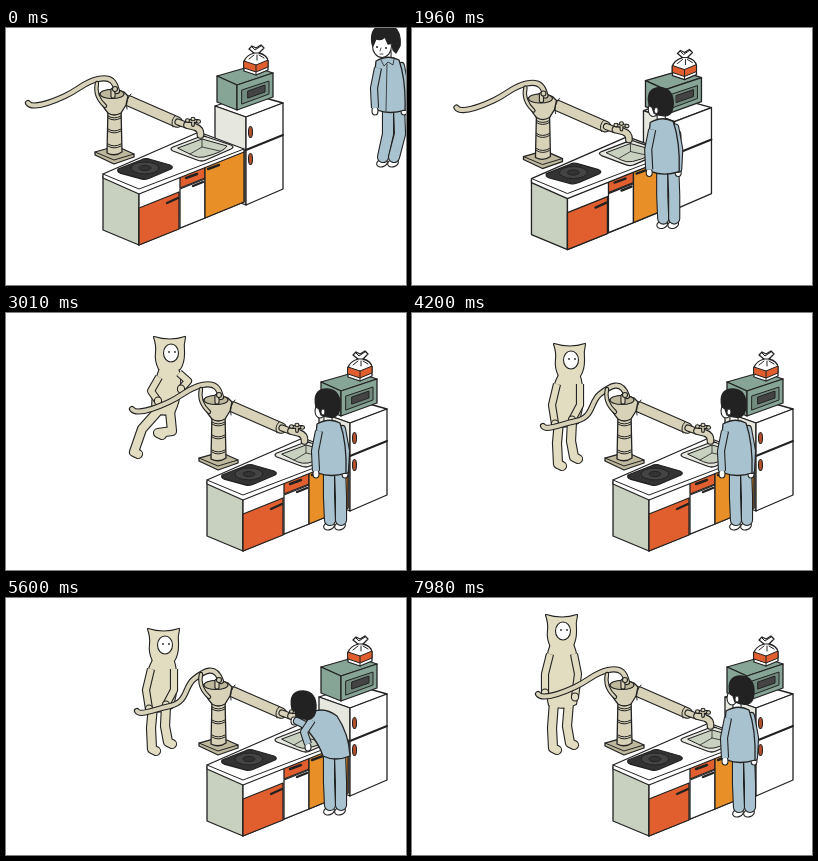
These frames come from a looping animation (400 by 257 pixels, 8000 ms). An HTML page with a canvas:

```html
<!DOCTYPE html>
<html lang="en">
<head>
<meta charset="utf-8">
<title>Kitchen pump</title>
<style>
  html, body { margin: 0; height: 100%; overflow: hidden; background: #fff; }
  canvas { display: block; width: 100vw; height: 100vh; }
</style>
</head>
<body>
<canvas id="stage"></canvas>
<script>
const LOOP = 8000, STEP = 70, W = 400, H = 257;
const INK = '#222', WHITE = '#fff', SAGE = '#c8d0bf', PALE = '#e6e8e0', TEAL = '#86a597', RED = '#e15f2e',
      AMBER = '#e98f28', CLAY = '#d7d2b8', CLAY_DARK = '#beb89d', CAT = '#e2dcc0', BLUE = '#a8c3cf';

const canvas = document.getElementById('stage');
const ratio = window.devicePixelRatio || 1;
canvas.width = W * ratio;
canvas.height = H * ratio;
const ctx = canvas.getContext('2d');

// Eased progress of t from a to b
const ease = (t, a, b) => {
  const k = Math.min(1, Math.max(0, (t - a) / (b - a)));
  return k * k * (3 - 2 * k);
};
const lerp = (a, b, k) => a + (b - a) * k;

// Blend two paths that share the same commands
const NUMBER = /-?\d+(\.\d+)?/g;
const mix = (a, b, k) => {
  const ends = b.match(NUMBER);
  let i = 0;
  return a.replace(NUMBER, n => lerp(+n, +ends[i++], k).toFixed(2));
};
const mixPose = (a, b, k) =>
  Object.fromEntries(Object.keys(a).map(part => [part, mix(a[part], b[part], k)]));
const point = text => text.match(NUMBER).slice(-2).map(Number);

function shape(d, fill, width = 1.3) {
  const path = new Path2D(d);
  if (fill) { ctx.fillStyle = fill; ctx.fill(path); }
  if (width) { ctx.strokeStyle = INK; ctx.lineWidth = width; ctx.stroke(path); }
}
function oval(x, y, rx, ry, fill, width = 1.1, tilt = 0) {
  ctx.beginPath();
  ctx.ellipse(x, y, rx, ry, tilt, 0, Math.PI * 2);
  ctx.fillStyle = fill;
  ctx.fill();
  if (width) { ctx.strokeStyle = INK; ctx.lineWidth = width; ctx.stroke(); }
}
function thick(path, width, color) {
  ctx.strokeStyle = color;
  ctx.lineWidth = width;
  ctx.stroke(path);
}
function limb(d, width, color, cap = 'round') {
  const path = new Path2D(d);
  ctx.lineCap = cap;
  thick(path, width + 2.2, INK);
  thick(path, width, color);
  ctx.lineCap = 'round';
}
// Several limbs and areas joined inside one outline
function silhouette(limbs, areas, width, color) {
  const lines = limbs.map(d => new Path2D(d)), bodies = areas.map(d => new Path2D(d));
  for (const line of lines) thick(line, width + 2.2, INK);
  for (const body of bodies) thick(body, 2.2, INK);
  for (const line of lines) thick(line, width, color);
  ctx.fillStyle = color;
  for (const body of bodies) ctx.fill(body);
}
function at(x, y, draw) {
  ctx.save();
  ctx.translate(x, y);
  draw();
  ctx.restore();
}

function fridge() {
  shape('M209,78 L245,66 L277,75 L240,89Z', WHITE);
  shape('M209,78 L240,89 V177 L209,165Z', PALE);
  shape('M240,89 L277,75 V161 L240,177Z', WHITE);
  shape('M240,122 L277,107', null, 2);
  oval(244.5, 104, 2, 5.5, '#b8512b');
  oval(244.5, 131, 2, 5.5, '#b8512b');
  // Microwave
  shape('M211,48 L246,38 L267,45 L231,57Z', TEAL);
  shape('M211,48 L231,57 V82 L211,74Z', TEAL);
  shape('M231,57 L267,45 V69 L231,82Z', TEAL);
  shape('M236,62 L263,53 V66 L236,76Z', '#718b7e', 1);
  shape('M242,63 L259,57 V64 L242,70Z', '#444', 1);
  // Bread bag
  shape('M238,34 Q239,28 248,25 L243,21 L246,18 L250,20 L255,17 L258,20 L253,25 Q261,27 262,33 V42 L250,47 L238,43Z', WHITE);
  shape('M238,33 L250,37 L262,32 V39 L250,44 L238,40Z', RED, 1);
  shape('M250,37 V47 M247,25 H254', null, 1);
  shape('M248,27 L243,31 M251,27 V32 M253,27 L258,30 M246,19 L249,22 L255,18', null, 1);
}

function cabinet() {
  shape('M97,148 L133,164 V217 L97,202Z', SAGE);
  shape('M133,164 L238,122 V174 L133,217Z', WHITE);
  shape('M133,180 L173,164 V201 L133,217Z', RED);
  shape('M174,149 L199,139 V150 L174,160Z', RED);
  shape('M174,161 L199,151 V190 L174,200Z', WHITE);
  shape('M199,139 L238,123 V174 L199,190Z', AMBER);
  shape('M161,175 L172,170 M180,150 L191,146 M187,158 L197,154 M202,141 L213,137', null, 2.4);
  shape('M97,146 L193,104 L238,121 V124 L133,166 L97,150Z', WHITE);
  shape('M97,146 L133,161 L238,121', null, 1);
  // Stove
  shape('M112,141 Q111,144 114,145 L136,151 Q140,152 144,150 L165,141 Q168,139 164,137 L143,131 Q139,130 135,132Z', '#333');
  oval(139, 140, 14, 6, '#444', 1);
  oval(139, 140, 6, 2.6, '#333', 1);
  // Sink
  shape('M167,119 Q163,121 167,123 L191,132 Q196,134 200,132 L225,121 Q229,119 225,117 L201,109 Q197,107 193,109Z', PALE);
  shape('M172,120 L196,111 L221,118 Q218,124 198,129 Q192,130 188,128Z', SAGE, 1);
  shape('M196,111 V119 L184,126 M196,119 L214,123', null, .8);
}

const HANDLE_UP = 'M22,75 C26,81 44,75 59,68 S78,54 92,51 S109,55 111,63';
const HANDLE_DOWN = 'M27,92 C30,97 42,91 60,87 S74,68 84,60 S105,45 111,62';

function pump(press) {
  shape('M89,124 L110,118 L128,126 V129 L108,136 L89,127Z', CLAY_DARK);
  shape('M89,124 L108,132 L128,126', null, 1);
  shape('M102,80 H115 L116,124 Q109,129 101,125Z', CLAY);
  for (const y of [88, 101, 116]) shape(`M102,${y} Q108,${y + 4} 115,${y} M102,${y + 2} Q108,${y + 6} 115,${y + 2}`, null, 1);
  limb('M123,73 L171,94', 9.5, CLAY);
  limb('M172,94 L180,97', 5, CLAY);
  shape('M125,66 Q119,72 121,81 M169,88 Q164,93 167,99', null, 1);
  shape('M93,66 Q106,58 118,64 L122,68 L120,77 L115,85 Q108,89 102,85 Q94,76 93,66Z', CLAY);
  oval(106, 66, 12, 4.5, CLAY_DARK);
  limb('M107,68 V62', 3, CLAY);
  limb(mix(HANDLE_UP, HANDLE_DOWN, press), 4, CLAY);
  limb('M91,55 Q88,68 99,78', 2.2, CLAY);
  oval(109, 61, 2.5, 2.5, CLAY);
  // Tap
  limb('M181,97 L189,99 Q195,101 194.5,107', 5.5, CLAY);
  limb('M187,97 V93 M182,93 L192,93', 1.6, CLAY);
  oval(181.5, 92.5, 2, 1.8, CLAY);
  oval(192.5, 93.5, 2, 1.8, CLAY);
  oval(187, 91, 2, 1.8, CLAY);
}

const STAND = {
  head: '150,33',
  torso: 'M139,46 Q150,42 161,46 Q171,72 164,106 Q150,113 137,107 Q129,72 139,46Z',
  armL: 'M138,56 L133,76 L133,95', armR: 'M162,56 L166,76 L163,99',
  legL: 'M142,104 L140,130 L141,150', legR: 'M157,104 L155,128 L158,145'
};
const PRESS = {
  head: '158,47',
  torso: 'M148,60 Q158,56 167,60 Q175,85 166,110 Q152,116 142,112 Q134,85 148,60Z',
  armL: 'M145,71 L140,92 L143,111', armR: 'M168,71 L168,92 L160,107',
  legL: 'M147,108 L145,130 L146,151', legR: 'M160,108 L159,128 L162,144'
};
const RUN_A = {
  head: '164,40',
  torso: 'M154,55 Q164,50 172,54 Q178,80 168,100 Q156,104 146,98 Q146,76 154,55Z',
  armL: 'M153,64 L145,78 L152,88', armR: 'M173,60 L182,68 L175,76',
  legL: 'M152,98 L136,116 L128,139', legR: 'M164,98 L166,118 L152,120'
};
const RUN_B = {
  ...RUN_A,
  armL: 'M153,64 L158,80 L170,78', armR: 'M173,60 L170,80 L160,86',
  legL: 'M152,98 L170,112 L166,134', legR: 'M164,98 L152,118 L134,116'
};

function hood(x, y) {
  const px = dx => (x + dx).toFixed(2), py = dy => (y + dy).toFixed(2);
  const corner = (cx, cy, ex, ey) => `Q${px(cx)},${py(cy)} ${px(ex)},${py(ey)}`;
  return `M${px(-16)},${py(-16)}` + corner(0, -11, 15, -16) + corner(13, -8, 14, 0) +
    corner(14, 10, 10, 16) + corner(0, 19, -11, 16) + corner(-15, 8, -14, 0) + corner(-13, -8, -16, -16) + 'Z';
}

function cat(t, press) {
  const stride = (1 - Math.cos((t - 3010) / 420 * Math.PI * 2)) / 2;
  const run = mixPose(RUN_A, RUN_B, stride);
  const pose = mixPose(mixPose(run, STAND, ease(t, 3050, 3380)), PRESS, press);
  const away = Math.min(0, t - 3010);
  const [x, y] = point(pose.head);
  const legs = [pose.legL, pose.legR].map(leg => {
    const [footX, footY] = point(leg);
    return `${leg} L${footX + 4},${footY + 2}`;
  });
  at(away * .235, away * .09, () => {
    silhouette(legs, [pose.torso, hood(x, y)], 8, CAT);
    limb(pose.armL, 6, CAT, 'butt');
    limb(pose.armR, 6, CAT, 'butt');
    oval(...point(pose.armL), 3.6, 4, CAT);
    oval(...point(pose.armR), 3.6, 4, CAT);
    oval(x + 1, y, 7.5, 9, WHITE);
    oval(x - 1, y - 1, .9, 1.1, INK, 0);
    oval(x + 5, y - 1, .9, 1.1, INK, 0);
  });
}

const TORSO = 'M-10,21 Q2,14 13,20 Q20,40 19,70 Q4,75 -9,70 Q-13,40 -10,21Z';
const TORSO_BENT = 'M-21,28 Q-6,16 10,28 Q22,46 23,68 Q8,74 -4,68 Q-8,56 -18,44Z';
const bentTorso = bend => mix(TORSO.replace(/ -10,21Z/, ' -10,21Z'), TORSO_BENT.replace('-18,44Z', '-18,44 Q-22,36 -21,28Z'), bend);

function faceFront() {
  oval(-4, 6, 9.5, 11.5, WHITE);
  shape('M-14,4 Q-17,-15 0,-15 Q16,-14 14,6 L10,13 L7,10 L6,3 L2,4 L-1,-3 Q-5,1 -10,-1 L-13,6Z', INK);
  oval(-9, 7, 1, 1.1, INK, 0);
  oval(0, 8, 1, 1.1, INK, 0);
  shape('M-5,8 L-6,11 M-6,14 H-3', null, .8);
}

function faceAway(turn, bend) {
  if (bend < .5) oval(-7 - 2 * turn, 8, 5, 7, WHITE);
  shape('M-11,4 Q-15,-14 0,-14 Q14,-13 13,4 Q12,13 7,14 Q0,15 -6,12 L-8,6Z', INK);
  if (bend < .5) oval(-4, 9, 2, 3, WHITE, .9);
}

function person(t) {
  const early = Math.min(1, t / 700), late = Math.min(1, Math.max(0, (t - 700) / 1000));
  const settle = ease(t, 1900, 2500), turn = ease(t, 7500, 7910);
  const x = 380 - 64 * early - 90 * late - 9 * settle + 3 * turn;
  const y = 12 + 28 * early + 29 * late + 2 * turn;
  const swing = t < 1700 ? Math.sin(t / 560 * Math.PI * 2) : 0;
  const liftR = Math.max(0, swing), liftL = Math.max(0, -swing);
  const bend = ease(t, 4500, 4900) - ease(t, 7000, 7500);
  const back = t >= 1540;

  at(x, y, () => {
    const shift = back ? 3 : -3;
    const legs = [
      { hip: 2, knee: 2, foot: shift - 5 * liftR, lift: liftL },
      { hip: 13, knee: 14, foot: 11 + shift + 6 * liftR, lift: liftR }
    ];
    for (const { hip, knee, foot, lift } of legs) {
      const sole = 121 - 26 * lift;
      oval(foot - 1, sole + 2, 5.5, 3.8, WHITE, 1.1, -.3);
      limb(`M${hip},66 L${knee},${94 - 6 * lift} L${foot},${sole - 4}`, 10, BLUE);
    }
    const sleeveR = mix(`M15,26 L19,48 L${18 - 4 * swing},67`, 'M-8,32 L-20,38 L-30,33', bend);
    const sleeveL = mix(`M-8,28 L-12,48 L${-11 + 4 * swing},68`, 'M-15,32 L-23,44 L-19,56', bend);
    const handR = point(sleeveR), handL = point(sleeveL);
    oval(handR[0] - 3 * bend, handR[1] + 4 * (1 - bend), 3, 4, WHITE);
    if (bend < .5) limb('M1,12 V20', 7, WHITE);
    limb(sleeveR, 6, BLUE);
    shape(bentTorso(bend), BLUE);
    oval(handL[0], handL[1] + 3, 3, 4, WHITE);
    limb(sleeveL, 6, BLUE, 'butt');
    if (!back) shape('M-5,20 L-2,26 L2,22 L7,25 L8,19 M1,24 L0,71', null, .8);
    at(-24 * bend + 5 * turn, 17 * bend, () => back ? faceAway(turn, bend) : faceFront());
  });
}

function draw(t) {
  ctx.setTransform(ratio, 0, 0, ratio, 0, 0);
  ctx.fillStyle = WHITE;
  ctx.fillRect(0, 0, W, H);
  ctx.lineCap = ctx.lineJoin = 'round';

  const pan = ease(t, 1720, 2520);
  const pumping = t > 3850 && t < 6650;
  const press = pumping ? (1 - Math.cos((t - 3850) / 700 * Math.PI * 2)) / 2 : 0;

  if (t > 2200) cat(t, press);
  at(104 * pan, 21 * pan, () => {
    fridge();
    cabinet();
    pump(press);
    person(t);
  });
}

const start = performance.now();
function frame() {
  const t = (performance.now() - start) % LOOP;
  draw(Math.floor(t / STEP) * STEP);
  requestAnimationFrame(frame);
}
frame();
</script>
</body>
</html>
```
